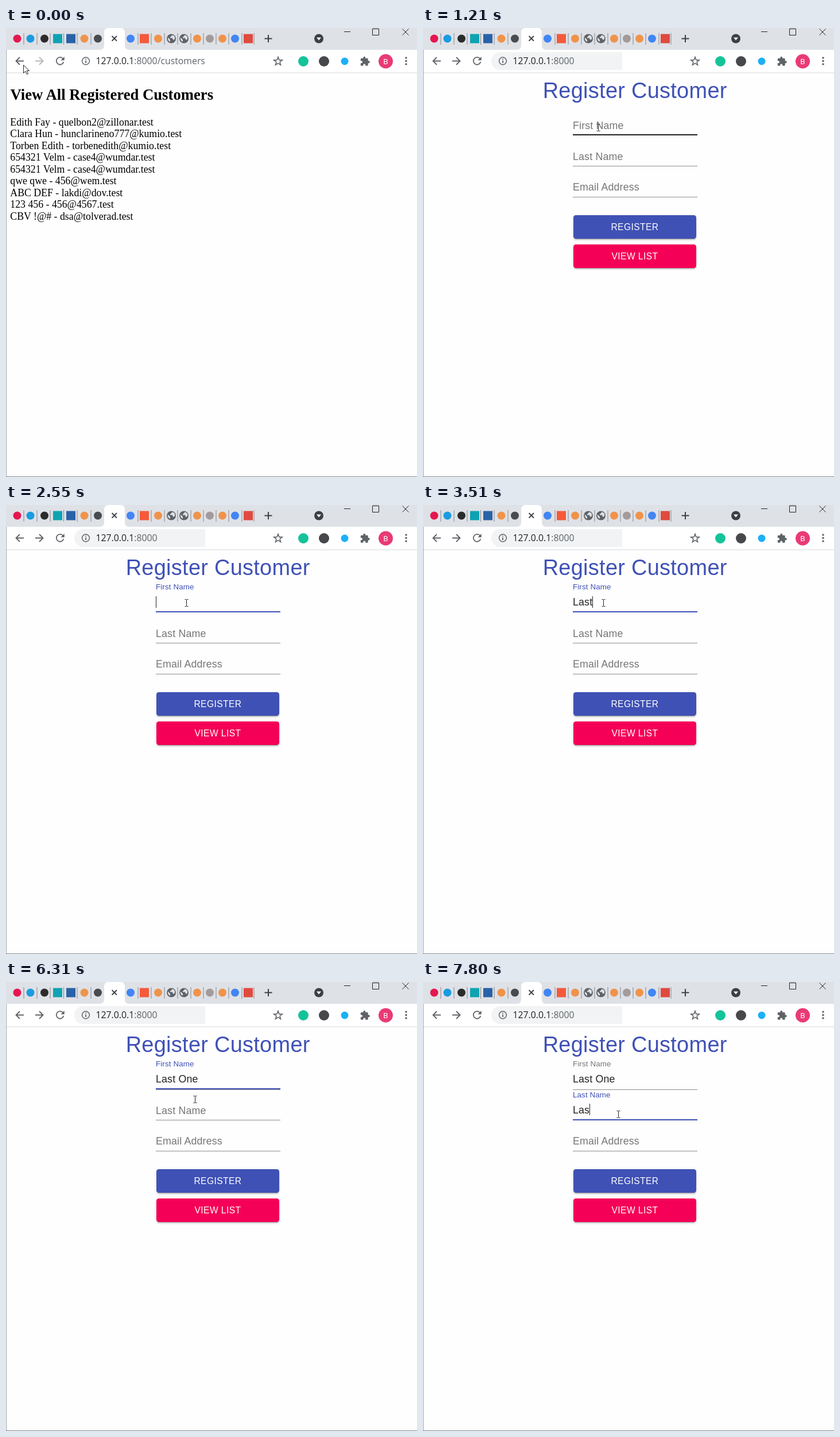
An HTML page that plays this animation: 716x782 px, repeating every 8 s.

```html
<!DOCTYPE html>
<html lang="en">
<head>
<meta charset="utf-8">
<title>Register Customer</title>
<style>
  html, body { margin: 0; width: 100%; height: 100%; overflow: hidden; background: #fefefe; }
  svg { position: absolute; left: 0; top: 0; display: block; }
  text { white-space: pre; }
  .serif { font: 17.8px "Liberation Serif", serif; }
  .serif .title { font-size: 26.7px; font-weight: bold; }
  .sans { font: 17.8px "Liberation Sans", sans-serif; letter-spacing: .00938em; }
  .sans .title { font-size: 37.95px; letter-spacing: .00735em; fill: #3f51b5; }
  .sans rect { shape-rendering: crispEdges; }
  .url { font: 15.8px "Open Sans", sans-serif; fill: #5f6368; }
  .line { fill: none; stroke: #5f6368; stroke-width: 1.8; }
  .button {
    position: absolute; left: 262px; width: 214px; height: 41px; border-radius: 4.4px;
    font: 15.575px/41px "Liberation Sans", sans-serif; letter-spacing: .02857em;
    color: #fff; text-align: center;
    box-shadow: 0 3.3px 1.1px -2.2px #0003, 0 2.2px 2.2px #00000024, 0 1.1px 5.6px #0000001f;
  }
</style>
</head>
<body>
<div id="buttons">
  <div class="button" style="top:326px;background:#3f51b5">REGISTER</div>
  <div class="button" style="top:377px;background:#f50057">VIEW LIST</div>
</div>
<svg id="stage" width="716" height="782" viewBox="0 0 716 782">
  <!-- tab strip -->
  <rect width="716" height="38" fill="#dee1e6"/>
  <path d="M163 38q8 0 8-8V8q0-8 8-8h20q8 0 8 8v22q0 8 8 8z" fill="#fff"/>
  <g id="tabs"></g>
  <path d="M184.5 14l8.500 8.500m0-8.500l-8.500 8.500" class="line" style="stroke:#3c4043"/>
  <path d="M450.500 18.500h13m-6.500-6.500v13" class="line" style="stroke:#3c4043;stroke-width:2"/>
  <circle cx="545" cy="18.500" r="8" fill="#3c4043"/>
  <path d="M541 16.500h8l-4 5z" fill="#fff"/>
  <path d="M589 6.500h11M638.500 1.500h11v11h-11zM690.500 1.500l11 11m0-11l-11 11" fill="none" stroke="#222"/>

  <!-- toolbar -->
  <rect y="38" width="716" height="40" fill="#fff"/>
  <rect y="77.500" width="716" height="1" fill="#d5d7da"/>
  <circle id="backHover" cx="23" cy="58" r="15.500" fill="#e4e5e7"/>
  <path d="M31 57.500H17.500m6.500-6.500l-6.500 6.500 6.500 6.500" class="line"/>
  <path id="forward" d="M51 57.500h13.500m-6.500-6.500l6.500 6.500-6.500 6.500" class="line"/>
  <path d="M99.200 53.300a6.400 6.400 0 1 0 1.200 5.700" class="line"/>
  <path d="M101.700 50v6.300h-6.300z" fill="#5f6368"/>
  <path id="pill" d="M347 42H134.500a15.500 15.500 0 0 0 0 31H347z" fill="#f1f3f4"/>
  <circle cx="139" cy="57.500" r="6.400" class="line" style="stroke-width:1.500"/>
  <path d="M139 56.500v4.500m0-7.500v1.600" class="line"/>
  <text class="url" x="156.500" y="63.300"><tspan fill="#202124">127.0.0.1</tspan>:8000<tspan id="path">/customers</tspan></text>
  <path id="star" class="line" style="stroke-width:1.600"/>
  <circle cx="518" cy="58" r="9" fill="#15c39a"/>
  <circle cx="554" cy="58" r="9" fill="#47484b"/>
  <circle cx="590" cy="58" r="6.500" fill="#1cb0f6"/>
  <path transform="translate(616.300 49) scale(.76)" fill="#5f6368" d="M20.5 11H19V7c0-1.1-.9-2-2-2h-4V3.500a2.500 2.500 0 0 0-5 0V5H4a2 2 0 0 0-2 2v3.800h1.500a2.700 2.700 0 0 1 0 5.400H2V20a2 2 0 0 0 2 2h3.800v-1.500a2.700 2.700 0 0 1 5.400 0V22H17a2 2 0 0 0 2-2v-4h1.500a2.500 2.500 0 0 0 0-5z"/>
  <circle cx="661.500" cy="58" r="12.500" fill="#e93a76"/>
  <text x="661.500" y="63" text-anchor="middle" fill="#fff" font-family="Roboto, sans-serif" font-size="13.500">B</text>
  <g fill="#5f6368"><circle cx="697" cy="52" r="1.800"/><circle cx="697" cy="57.500" r="1.800"/><circle cx="697" cy="63" r="1.800"/></g>

  <!-- window edge -->
  <rect y="38" width="1" height="744" fill="#a3a5a8"/>
  <rect y="781" width="716" height="1" fill="#85878a"/>

  <g id="list" class="serif"><text class="title" x="7.500" y="125">View All Registered Customers</text></g>
  <g id="form" class="sans"><text class="title" x="208.700" y="122.400">Register Customer</text></g>
  <rect id="caret" width="1" height="20" fill="#212121"/>

  <path id="arrow" d="M0 0v14l3.400-3.200 2.400 5.400 2.300-1-2.400-5.200h4.300z" fill="#fff" stroke="#222"/>
  <path id="beam" d="M-3-6h2L0-5.500 1-6h2M0-5.500v11M-3 6h2l1-.5L1 6h2" fill="none" stroke="#222"/>
</svg>
<script>
const LOOP = 8000;
const $ = id => document.getElementById(id);

function add(parent, tag, attrs, text) {
  const node = document.createElementNS('http://www.w3.org/2000/svg', tag);
  for (const key in attrs) node.setAttribute(key, attrs[key]);
  if (text) node.textContent = text;
  return parent.appendChild(node);
}
const show = (node, on) => { node.style.display = on ? '' : 'none'; };

// Tab icons: [centre x, colour, shape]
const ORANGE = '#f0934a', BLUE = '#4285f4', GREY = '#5f6368';
[[19.5, '#e5174f', 'dot'], [42.5, '#1b9be0', 'dot'], [67, '#2b2b2b', 'dot'],
 [90, '#0fa3b1', 'box'], [113, '#2a62a8', 'box'], [136.5, ORANGE, 'dot'],
 [160, '#484b50', 'dot'], [217, BLUE, 'dot'], [241, '#f4593a', 'box'],
 [265, ORANGE, 'dot'], [288, GREY, 'globe'], [310, GREY, 'globe'],
 [333, ORANGE, 'dot'], [355, '#a39a9c', 'dot'], [377, ORANGE, 'dot'],
 [399, BLUE, 'dot'], [422, '#e04a3f', 'box']
].forEach(([x, fill, shape]) => {
  const tabs = $('tabs');
  if (shape === 'box') return add(tabs, 'rect', { x: x - 8, y: 10.5, width: 16, height: 16, fill });
  add(tabs, 'circle', { cx: x, cy: 18.5, r: shape === 'globe' ? 8 : 7, fill });
  if (shape === 'globe') add(tabs, 'path', {
    d: `M${x - 6} 16.5l4 4v3.5q-5-2-4-7.5zM${x + 1} 12.5q-1 3-3 3v2h4l1 3h2q3-4-1-7.5z`, fill: '#dee1e6'
  });
});
[31, 54, 77, 100.5, 124, 148, 230, 253, 276, 299, 322, 344, 366, 388, 411, 432]
  .forEach(x => add($('tabs'), 'rect', { x: x - .5, y: 9, width: 1, height: 20, fill: '#85888d' }));

const starPoint = i => {
  const r = i % 2 ? 3.2 : 7.6, a = i * Math.PI / 5;
  return `${474 + r * Math.sin(a)} ${58.2 - r * Math.cos(a)}`;
};
$('star').setAttribute('d', 'M' + Array.from({ length: 10 }, (_, i) => starPoint(i)).join('L') + 'z');

['Edith Fay - quelbon2@zillonar.test', 'Clara Hun - hunclarineno777@kumio.test',
 'Torben Edith - torbenedith@kumio.test', '654321 Velm - case4@wumdar.test',
 '654321 Velm - case4@wumdar.test', 'qwe qwe - 456@wem.test',
 'ABC DEF - lakdi@dov.test', '123 456 - 456@4567.test', 'CBV !@# - dsa@tolverad.test'
].forEach((line, i) => add($('list'), 'text', { x: 7.3, y: 169.7 + i * 20.5 }, line));

const FIELD_STEP = 53.6;
const fields = ['First Name', 'Last Name', 'Email Address'].map((name, i) => {
  const g = add($('form'), 'g', { transform: `translate(261 ${i * FIELD_STEP})` });
  return {
    base: add(g, 'rect', { y: 186.6, width: 217, height: 1, fill: '#8f8f8f' }),
    dark: add(g, 'rect', { y: 185.2, width: 217, height: 2.2, fill: '#212121' }),
    blue: add(g, 'rect', { fill: '#3f51b5' }),
    label: add(g, 'text', {}, name),
    value: add(g, 'text', { y: 175, fill: '#212121' })
  };
});

// Each step overrides part of the state. shrink and focus run from 0 to 1 per field.
const steps = [
  [0, { page: 'list', url: 'long', back: false, pointer: 'arrow', at: [30, 64], hover: -1,
        shrink: [0, 0, 0], focus: [0, 0, 0], text: ['', '', ''], active: 0, caret: false }],
  [150, { back: true }],
  [540, { page: 'form' }],
  [660, { url: 'short' }],
  [940, { at: [92, 108] }],
  [1060, { back: false, at: [250, 188] }],
  [1210, { pointer: 'beam', at: [305, 173], hover: 0 }],
  [1330, { at: [314, 170] }],
  [1480, { caret: true, shrink: [.04, 0, 0], focus: [.04, 0, 0] }],
  [1600, { shrink: [.91, 0, 0], focus: [.91, 0, 0] }],
  [1720, { shrink: [1, 0, 0], focus: [1, 0, 0] }],
  [2150, { caret: false }],
  [2550, { caret: true }],
  [3080, { text: ['L', '', ''] }],
  [3360, { text: ['Las', '', ''] }],
  [3510, { text: ['Last', '', ''] }],
  [4100, { caret: false }],
  [4660, { caret: true }],
  [4780, { text: ['Last ', '', ''] }],
  [5240, { caret: false }],
  [5390, { caret: true, text: ['Last O', '', ''] }],
  [5670, { text: ['Last One', '', ''] }],
  [6190, { caret: false, at: [319, 180] }],
  [6310, { at: [329, 204], hover: -1 }],
  [6430, { at: [338, 224], hover: 1 }],
  [6550, { at: [340, 230] }],
  [6670, { caret: true, active: 1, shrink: [1, .39, 0], focus: [.61, .39, 0] }],
  [6820, { shrink: [1, .99, 0], focus: [.02, .98, 0] }],
  [6970, { shrink: [1, 1, 0], focus: [0, 1, 0] }],
  [7250, { caret: false }],
  [7530, { caret: true, text: ['Last One', 'L', ''] }],
  [7800, { text: ['Last One', 'Las', ''] }]
];

function drawField(field, i, s) {
  const focus = s.focus[i], shrink = s.shrink[i], done = focus === 1;
  const width = 217 * focus;
  show(field.base, s.hover !== i);
  show(field.dark, s.hover === i && !done);
  Object.entries({ x: (217 - width) / 2, y: done ? 185.2 : 186, width, height: done ? 2.2 : 2 })
    .forEach(([key, v]) => field.blue.setAttribute(key, v));
  field.label.setAttribute('transform', `translate(0 ${176 - 29 * shrink}) scale(${1 - .25 * shrink})`);
  field.label.style.fill = `color-mix(in srgb, #3f51b5 ${focus * 100}%, #757575)`;
  field.value.textContent = s.text[i];
}

function draw(time) {
  const s = Object.assign({}, ...steps.filter(([start]) => start <= time).map(step => step[1]));
  const form = s.page === 'form', short = s.url === 'short';
  show($('list'), !form);
  show($('form'), form);
  show($('buttons'), form);
  show($('backHover'), s.back);
  show($('pill'), short);
  show($('path'), !short);
  $('forward').style.stroke = short ? '#5f6368' : '#b5b7ba';
  fields.forEach((field, i) => drawField(field, i, s));

  show($('caret'), s.caret);
  if (s.caret) {
    const length = fields[s.active].value.getComputedTextLength();
    $('caret').setAttribute('x', 261 + Math.floor(length));
    $('caret').setAttribute('y', 159 + 53 * s.active);
  }
  // Half a pixel keeps the one-pixel outlines sharp.
  const [x, y] = s.at;
  for (const id of ['arrow', 'beam']) {
    show($(id), s.pointer === id);
    $(id).setAttribute('transform', `translate(${x + .5} ${y + .5})`);
  }
}

const start = performance.now();
function tick() {
  draw((performance.now() - start) % LOOP);
  requestAnimationFrame(tick);
}
tick();
</script>
</body>
</html>
```
